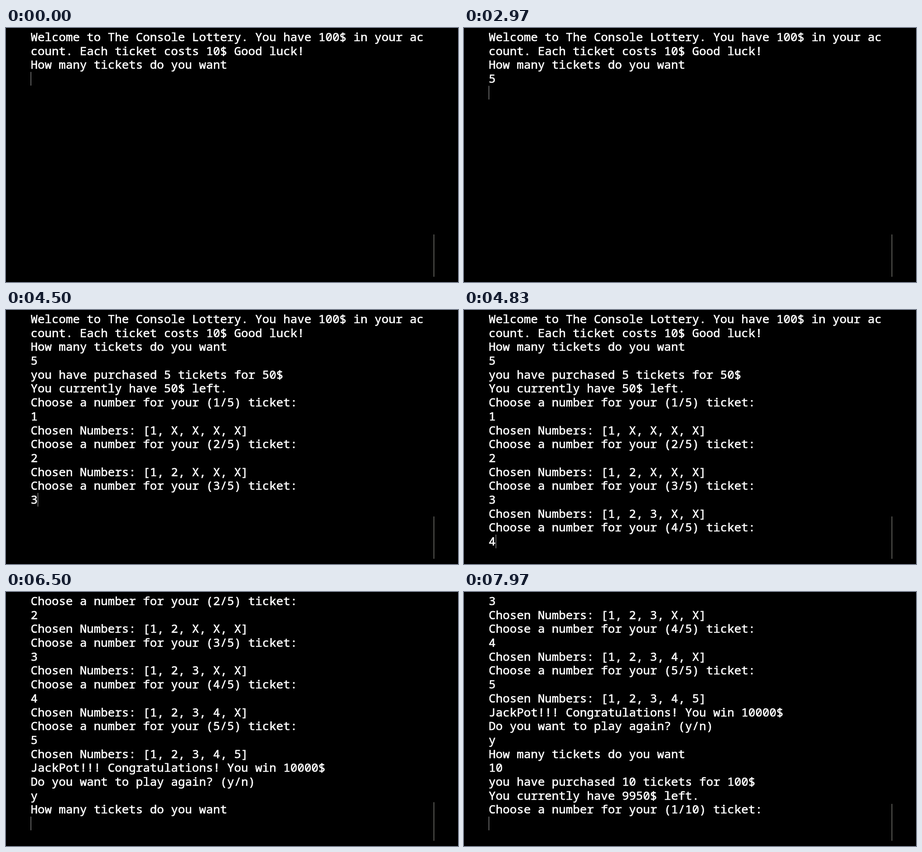
These frames come from a looping animation (998 by 561 pixels, 8 s). An HTML page with a canvas:

```html
<!DOCTYPE html>
<html lang="en">
<head>
<meta charset="utf-8">
<title>Console lottery</title>
<style>
  html, body { margin: 0; width: 100%; height: 100%; overflow: hidden; background: #000; }
  canvas { display: block; }
</style>
</head>
<body>
<canvas id="stage" width="998" height="561"></canvas>
<script>
const ctx = document.getElementById("stage").getContext("2d");

const LOOP = 8000;
const BLINK = 530;
const ROWS = 17;
const LEFT = 54.4, TOP = 4.9, LINE = 30.7, BASELINE = 24;
const SCROLLBAR = { x: 944.2, top: 456, bottom: 549.5, step: 0.92 };

const choose = (n, total) => `Choose a number for your (${n}/${total}) ticket:\n`;
const chosen = n =>
  `Chosen Numbers: [${[1, 2, 3, 4, 5].map(i => i <= n ? i : "X").join(", ")}]\n`;
const purchase = (count, left) =>
  `you have purchased ${count} tickets for ${count * 10}$\n` +
  `You currently have ${left}$ left.\n` + choose(1, count);

// Console output and key presses: [time in ms, text appended]
const events = [
  [-330, "Welcome to The Console Lottery. You have 100$ in your ac\n" +
         "count. Each ticket costs 10$ Good luck!\n" +
         "How many tickets do you want\n"],
  [2350, "5"],
  [2800, "\n"],
  [3120, purchase(5, 50)],
  [3600, "1"],
  [3760, "\n" + chosen(1) + choose(2, 5)],
  [4010, "2"],
  [4170, "\n" + chosen(2) + choose(3, 5)],
  [4420, "3"],
  [4580, "\n" + chosen(3) + choose(4, 5)],
  [4780, "4"],
  [4930, "\n" + chosen(4) + choose(5, 5)],
  [5130, "5"],
  [5290, "\n" + chosen(5) +
         "JackPot!!! Congratulations! You win 10000$\n" +
         "Do you want to play again? (y/n)\n"],
  [6130, "y"],
  [6450, "\nHow many tickets do you want\n"],
  [7130, "1"],
  [7280, "0"],
  [7580, "\n"],
  [7850, purchase(10, 9950)]
];

function drawText(text, x, y) {
  ctx.fillText(text, x, y);
  ctx.strokeText(text, x, y); // a thin outline gives the semi-bold weight
}

function draw(time) {
  const past = events.filter(([at]) => at <= time);
  const lines = past.map(([, text]) => text).join("").split("\n");
  const scroll = Math.max(0, lines.length - ROWS);
  const visible = lines.slice(scroll);

  ctx.fillStyle = "#000";
  ctx.fillRect(0, 0, 998, 561);

  ctx.font = '500 25.83px "Noto Sans Mono", "DejaVu Sans Mono", monospace';
  ctx.fillStyle = ctx.strokeStyle = "#fff";
  ctx.lineWidth = 0.65;
  ctx.lineJoin = "round";
  visible.forEach((line, row) => drawText(line, LEFT, TOP + row * LINE + BASELINE));

  // The cursor stays lit for one blink after each change.
  const sinceChange = time - past[past.length - 1][0];
  if (Math.floor(sinceChange / BLINK) % 2 === 0) {
    const row = visible.length - 1;
    const x = LEFT + ctx.measureText(visible[row]).width;
    ctx.fillStyle = "#a0a0a0";
    ctx.fillRect(x, TOP + row * LINE, 1.2, LINE - 0.5);
  }

  const thumbTop = SCROLLBAR.top + scroll * SCROLLBAR.step;
  ctx.fillStyle = "#94948a";
  ctx.fillRect(SCROLLBAR.x, thumbTop, 1.2, SCROLLBAR.bottom - thumbTop);
}

const start = performance.now();
function frame() {
  draw((performance.now() - start) % LOOP);
  requestAnimationFrame(frame);
}
frame();
</script>
</body>
</html>
```
